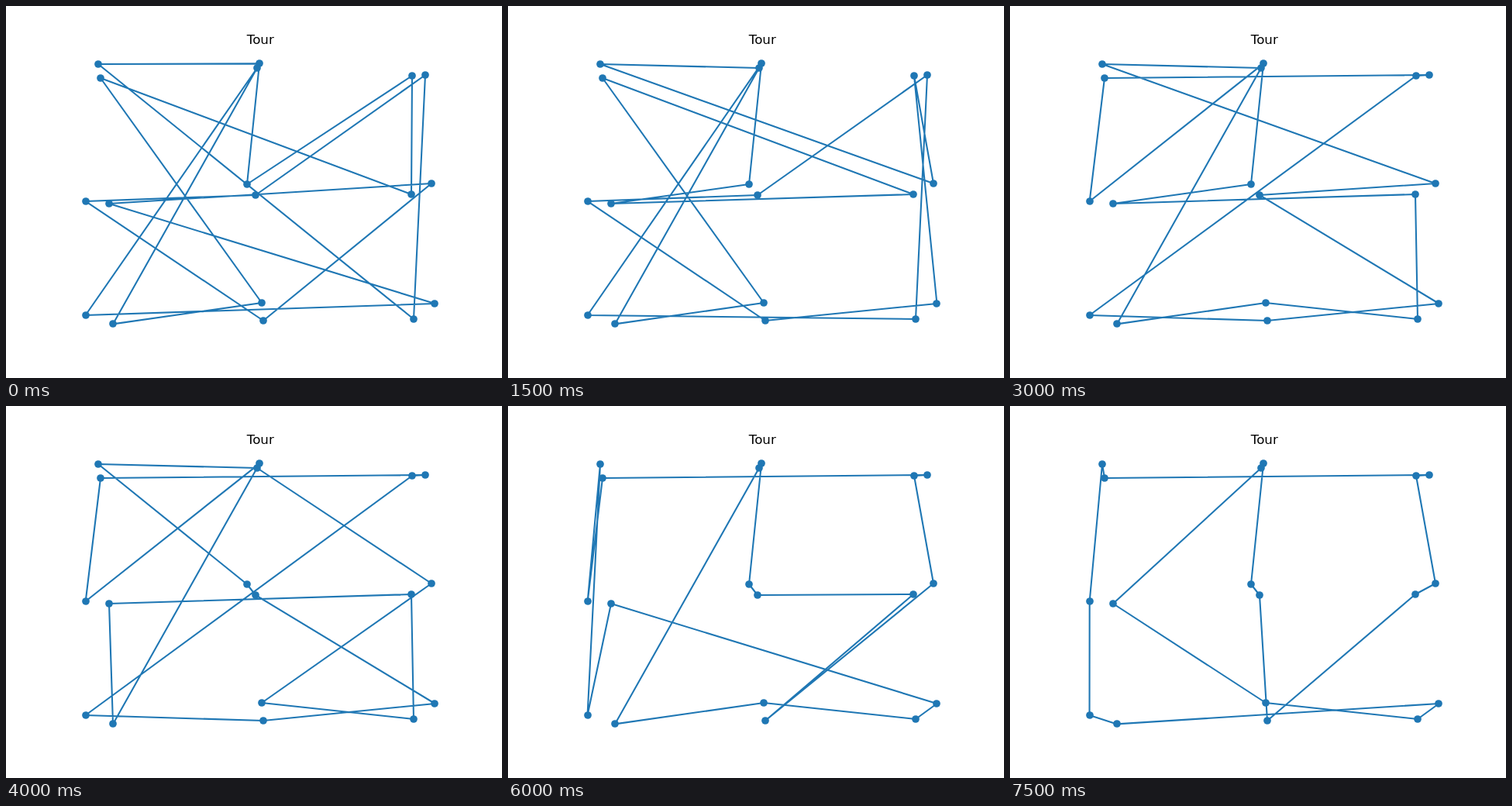
An HTML page that plays this animation: 640x480 px, repeating every 8 s.

```html
<!DOCTYPE html>
<html lang="en">
<head>
<meta charset="utf-8">
<title>Tour</title>
<style>
  html, body { margin: 0; width: 100%; height: 100%; overflow: hidden; background: #fff; }
  svg { display: block; width: 640px; height: 480px; }
  text { font: 16.667px "DejaVu Sans", sans-serif; text-anchor: middle; }
  polygon { fill: none; stroke: #1f77b4; stroke-width: 2.083; stroke-linejoin: round; }
  circle { fill: #1f77b4; }
</style>
</head>
<body>
<svg viewBox="0 0 640 480">
  <text x="328.3" y="49">Tour</text>
  <polygon id="tour"/>
  <g id="cities"></g>
</svg>
<script>
const STEP = 500;
const cities = {
  A: [119, 75], B: [122, 93], C: [327, 74.4], D: [324, 80], E: [524, 90], F: [541, 89],
  G: [102.7, 252], H: [133, 255], I: [311, 230], J: [322, 244], K: [523, 243], L: [549, 229],
  M: [102.55, 399], N: [138, 410.4], O: [330, 383], P: [332, 406], Q: [526, 404], R: [553.45, 384]
};

// Each step exchanges two cities in the visiting order.
const start = 'CAQFJGPLHRMDNOBKEI';
const swaps = 'LR AM EH BQ EJ GM IL LN MN LN AC KR HN KP AG'.split(' ');

const swap = (order, [a, b]) =>
  order.replace(/./g, c => c === a ? b : c === b ? a : c);

const tours = [start];
for (const pair of swaps) tours.push(swap(tours[tours.length - 1], pair));

const group = document.getElementById('cities');
for (const [x, y] of Object.values(cities)) {
  const dot = document.createElementNS('http://www.w3.org/2000/svg', 'circle');
  dot.setAttribute('cx', Math.round(x));
  dot.setAttribute('cy', Math.round(y));
  dot.setAttribute('r', 4.86);
  group.append(dot);
}

const line = document.getElementById('tour');
let shown = -1;

function draw() {
  const step = Math.floor(performance.now() / STEP) % tours.length;
  if (step !== shown) {
    shown = step;
    line.setAttribute('points', [...tours[step]].map(c => cities[c]).join(' '));
  }
  requestAnimationFrame(draw);
}
draw();
</script>
</body>
</html>
```
